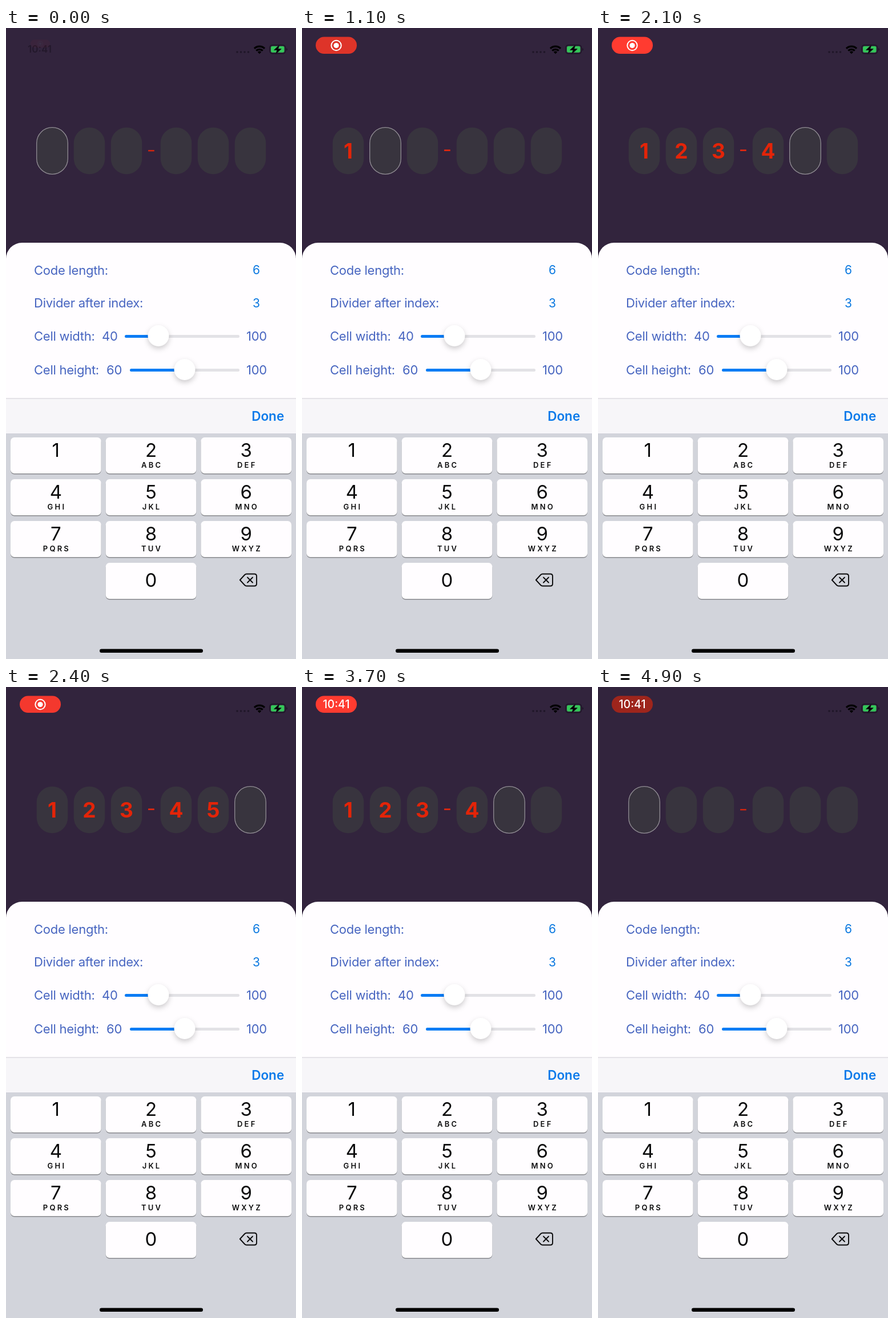
Animation, 508 px wide and 1102 px high, one loop 5000 ms. Source, as an HTML page:

```html
<!DOCTYPE html>
<html lang="en">
<head>
<meta charset="utf-8">
<title>Code input</title>
<style>
html, body { margin: 0; width: 100%; height: 100%; overflow: hidden; background: #32243d; }
svg { display: block; width: 100vw; height: 100vh; font-family: Inter, "Liberation Sans", sans-serif; }
.mid { text-anchor: middle; }
.label { font-size: 22px; letter-spacing: -.25px; fill: #4765c0; }
.value { font-size: 21px; fill: #0a78e0; }
.num { font-size: 33px; fill: #0b0b0c; }
.abc { font-size: 13px; font-weight: 600; letter-spacing: 3.2px; fill: #0b0b0c; }
.digit { font-size: 37px; font-weight: 700; fill: #e32408; }
.thumb { fill: #fff; filter: drop-shadow(0 4px 5px rgba(0,0,0,.2)); }
</style>
</head>
<body>
<svg id="stage" viewBox="0 0 508 1102" preserveAspectRatio="none">
  <rect width="508" height="1102" fill="#32243d"/>

  <text id="clock" class="mid" x="59" y="43" font-size="17" font-weight="600" fill="#170f1e">10:41</text>
  <g id="pill">
    <rect id="pillBox" x="24" y="15.5" width="72" height="29.5" rx="14.75"/>
    <g id="rec" fill="none" stroke="#fff" stroke-width="2">
      <circle cx="60" cy="30.5" r="8.7"/>
      <circle cx="60" cy="30.5" r="4.6" fill="#fff" stroke="none"/>
    </g>
    <text id="pillTime" class="mid" x="60" y="37" font-size="19.5" font-weight="500" fill="#fff">10:41</text>
  </g>

  <g fill="#1f1628">
    <circle cx="405" cy="42" r="1.8"/><circle cx="411.5" cy="42" r="1.8"/>
    <circle cx="418" cy="42" r="1.8"/><circle cx="424.5" cy="42" r="1.8"/>
  </g>
  <g fill="none" stroke="#000" stroke-width="3.2">
    <path d="M435 35.8a13 13 0 0 1 18 0"/>
    <path d="M438.3 39.6a8.2 8.2 0 0 1 11.4 0"/>
    <path d="M444 45.2l-3.2-3.3a4.6 4.6 0 0 1 6.4 0z" fill="#000" stroke="none"/>
  </g>
  <rect x="462" y="29.8" width="27.5" height="15" rx="4.5" fill="#32243d" stroke="#1d1526" stroke-width="1.4"/>
  <rect x="464" y="31.8" width="23.5" height="11" rx="2.8" fill="#34c759"/>
  <path d="M491 35v4.8q2-.7 2-2.4t-2-2.4z" fill="#1d1526"/>
  <path d="M479 29.5l-9.5 9h5.5l-2.4 7 9.6-9h-5.6z" fill="#000" stroke="#1d1526"/>

  <g id="cells"></g>
  <rect id="dash" x="249" width="10.8" height="2.7" rx=".5"/>

  <path d="M0 647V403a28 28 0 0 1 28-28h452a28 28 0 0 1 28 28v244z" fill="#fffdff"/>
  <g id="form"></g>

  <rect y="647" width="508" height="61" fill="#f7f6f9"/>
  <rect y="646.5" width="508" height="1" fill="#cfced3"/>
  <text class="mid" x="458.7" y="685.5" font-size="22.5" font-weight="600" fill="#0a7aea">Done</text>
  <rect y="708" width="508" height="394" fill="#d2d4db"/>
  <g id="keys"></g>
  <g id="del" stroke="#0b0b0c" stroke-width="1.9" stroke-linejoin="round" stroke-linecap="round">
    <path d="M409.8 964l8.3-9q1.4-1.5 3.4-1.5h13.5q4 0 4 4v13q0 4-4 4h-13.5q-2 0-3.4-1.5z"/>
    <path id="delX" d="M423 959.5l9 9m0-9l-9 9"/>
  </g>
  <rect x="164" y="1084.5" width="181" height="6.6" rx="3.3"/>
</svg>
<script>
const $ = id => document.getElementById(id);
const LOOP = 5000;
const typed = [1000, 1300, 1600, 2000, 2400, 2800];
const erased = [3400, 3600, 3800, 4000, 4200, 4400];
const PRESS = 120, TAP = 100;

function add(parent, tag, attrs, text = '') {
  const el = document.createElementNS('http://www.w3.org/2000/svg', tag);
  for (const k in attrs) el.setAttribute(k, attrs[k]);
  el.textContent = text;
  return parent.appendChild(el);
}
const set = (el, k, v) => el.setAttribute(k, v);
const clamp = x => Math.max(0, Math.min(1, x));
const ease = x => (x = clamp(x), x * x * (3 - 2 * x));

// Code cells
const cells = [81, 146, 211, 298, 363, 428].map((x, i) => ({
  box: add($('cells'), 'rect', { x: x - 27.3, y: 173.7, width: 54.6, height: 81.6, rx: 27.3,
    fill: '#38343e', 'stroke-width': 1.3 }),
  digit: add($('cells'), 'text', { class: 'mid digit', x, y: 227.5 }, i + 1)
}));

// Settings
const form = $('form');
const label = (x, y, s) => add(form, 'text', { class: 'label', x, y }, s);
function slider(y, name, value, valueX, left, knob) {
  label(49, y + 8, name);
  label(valueX, y + 8, value);
  label(421, y + 8, 100);
  const bar = (w, fill) => add(form, 'rect', { x: left, y: y - 2, width: w, height: 5, rx: 2.5, fill });
  bar(409 - left, '#e3e2e6');
  bar(knob - left, '#0a7cf5');
  add(form, 'circle', { class: 'thumb', cx: knob, cy: y - .5, r: 18.5 });
}
label(49, 431, 'Code length:');
label(49, 488, 'Divider after index:');
add(form, 'text', { class: 'mid value', x: 438.5, y: 430 }, 6);
add(form, 'text', { class: 'mid value', x: 438.5, y: 487.5 }, 3);
slider(538, 'Cell width:', 40, 168, 208, 267);
slider(597, 'Cell height:', 60, 176, 217, 313);

// Number pad
const letters = ['', 'ABC', 'DEF', 'GHI', 'JKL', 'MNO', 'PQRS', 'TUV', 'WXYZ'];
function key(n, col, row, abc) {
  const x = 8 + col * 166.7, y = 715 + row * 73, cx = x + 79.3;
  const box = { x, y, width: 158.6, height: 63, rx: 6.5 };
  add($('keys'), 'rect', { ...box, y: y + 1.4, fill: '#898a8e' });
  const face = add($('keys'), 'rect', box);
  add($('keys'), 'text', { class: 'mid num', x: cx, y: y + (n ? 34 : 42) }, n);
  add($('keys'), 'text', { class: 'mid abc', x: cx + 1.6, y: y + 53 }, abc);
  return face;
}
const faces = letters.map((abc, i) => key(i + 1, i % 3, Math.floor(i / 3), abc));
set(key(0, 1, 3, ''), 'fill', '#fffdff');

function drawStatus(t) {
  set($('clock'), 'opacity', .55 * (1 - clamp(t / 250)));
  const grow = ease((t + 60) / 500), s = .45 + .55 * grow;
  set($('pill'), 'opacity', grow);
  set($('pill'), 'transform', `translate(60 ${27 + 3 * grow}) scale(${s}) translate(-60 -30)`);

  // Recording light dims every 2.1 s
  const gap = Math.abs((t - 750 + 3150) % 2100 - 1050);
  const glow = ease(gap / 570);
  const mix = (a, b) => Math.round(a + (b - a) * glow);
  set($('pillBox'), 'fill', `rgb(${mix(156, 255)},${mix(37, 59)},${mix(28, 48)})`);

  const swap = ease((t - 3000) / 380);
  set($('rec'), 'opacity', 1 - swap);
  set($('pillTime'), 'opacity', swap);
}

function draw(now) {
  const t = now % LOOP;
  const past = list => list.filter(x => t >= x).length;
  const count = past(typed) - past(erased);

  drawStatus(t);
  cells.forEach((c, i) => {
    set(c.box, 'stroke', i === count ? '#918d94' : 'none');
    set(c.digit, 'visibility', i < count ? 'visible' : 'hidden');
  });
  set($('dash'), 'y', count ? 212.2 : 212.9);
  set($('dash'), 'fill', count ? '#df2810' : '#cf2510');
  faces.forEach((f, i) => {
    const down = t >= typed[i] - PRESS && t < typed[i];
    set(f, 'fill', down ? '#b4b8c2' : '#fffdff');
  });
  const tap = erased.some(x => t >= x && t < x + TAP);
  set($('del'), 'fill', tap ? '#0b0b0c' : 'none');
  set($('delX'), 'stroke', tap ? '#fff' : '#0b0b0c');
  requestAnimationFrame(frame);
}

const start = performance.now();
function frame() { draw(performance.now() - start); }
frame();
</script>
</body>
</html>
```
